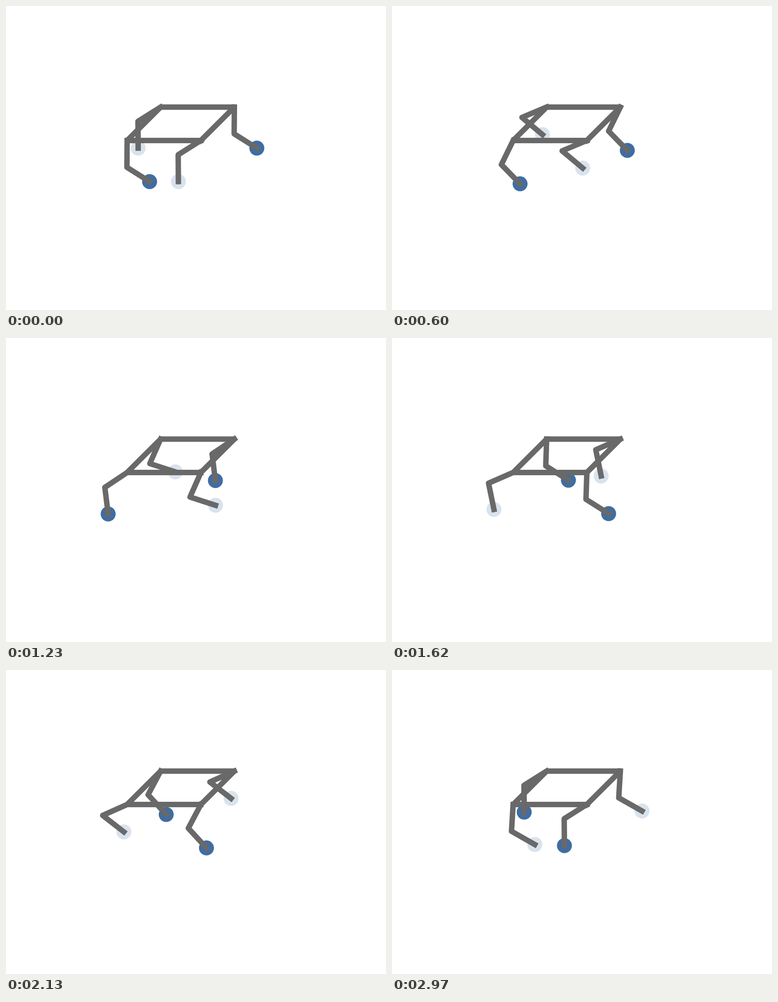
These frames come from a looping animation (837 by 669 pixels, 3000 ms). An HTML page with a canvas:

```html
<!DOCTYPE html>
<html lang="en">
<head>
<meta charset="utf-8">
<title>Trotting quadruped</title>
<style>
  html, body { margin: 0; width: 100%; height: 100%; overflow: hidden; background: #fff; }
  canvas { display: block; }
</style>
</head>
<body>
<canvas id="stage" width="837" height="669"></canvas>
<script>
const ctx = document.getElementById('stage').getContext('2d');
const LOOP = 3000, STEP = 30;
const BONE = 59, STRIDE = 49.5, GROUND = 90.4, LIFT = 31;
const { sin, cos, PI } = Math;

// Hips in order: near left, near right, far right, far left
const hips = [[266.8, 296], [429.2, 296], [503, 222.4], [340.6, 222.4]];
const body = [1, 0, 3, 2, 1].map(i => hips[i]);

// Foot position relative to the hip: first half on the ground, second half in the air
function footAt(phase) {
  const u = phase * 2 % 1;
  if (phase < 0.5) return [STRIDE * cos(PI * u), GROUND + 5.7 * sin(PI * u) ** 3];
  return [STRIDE * (2 * u - 1) - 0.8 * sin(4 * PI * u), GROUND - 4 * LIFT * u * (1 - u)];
}

// Two-bone leg with equal bones, knee bending to the left
function legAt([hx, hy], phase) {
  const [x, y] = footAt(phase);
  const bend = Math.acos(Math.hypot(x, y) / (2 * BONE));
  const thigh = Math.atan2(x, y) - bend;
  return {
    grounded: phase < 0.5,
    points: [[hx, hy], [hx + BONE * sin(thigh), hy + BONE * cos(thigh)], [hx + x, hy + y]]
  };
}

function polyline(points) {
  ctx.beginPath();
  points.forEach(p => ctx.lineTo(...p));
  ctx.stroke();
}

function draw(ms) {
  const phase = Math.floor(ms % LOOP / STEP) * STEP / LOOP;
  const legs = hips.map((hip, i) => legAt(hip, (phase + i % 2 / 2) % 1));

  ctx.fillStyle = '#fff';
  ctx.fillRect(0, 0, 837, 669);

  for (const { grounded, points } of legs) {
    ctx.fillStyle = grounded ? '#406da2' : '#d9e3ed';
    ctx.beginPath();
    ctx.arc(...points[2], 16.5, 0, 2 * PI);
    ctx.fill();
  }

  ctx.strokeStyle = '#696969';
  ctx.lineWidth = 12;
  ctx.lineCap = 'square';
  ctx.lineJoin = 'round';
  polyline(body);
  legs.forEach(leg => polyline(leg.points));
}

const start = performance.now();
function tick() {
  draw(performance.now() - start);
  requestAnimationFrame(tick);
}
tick();
</script>
</body>
</html>
```
